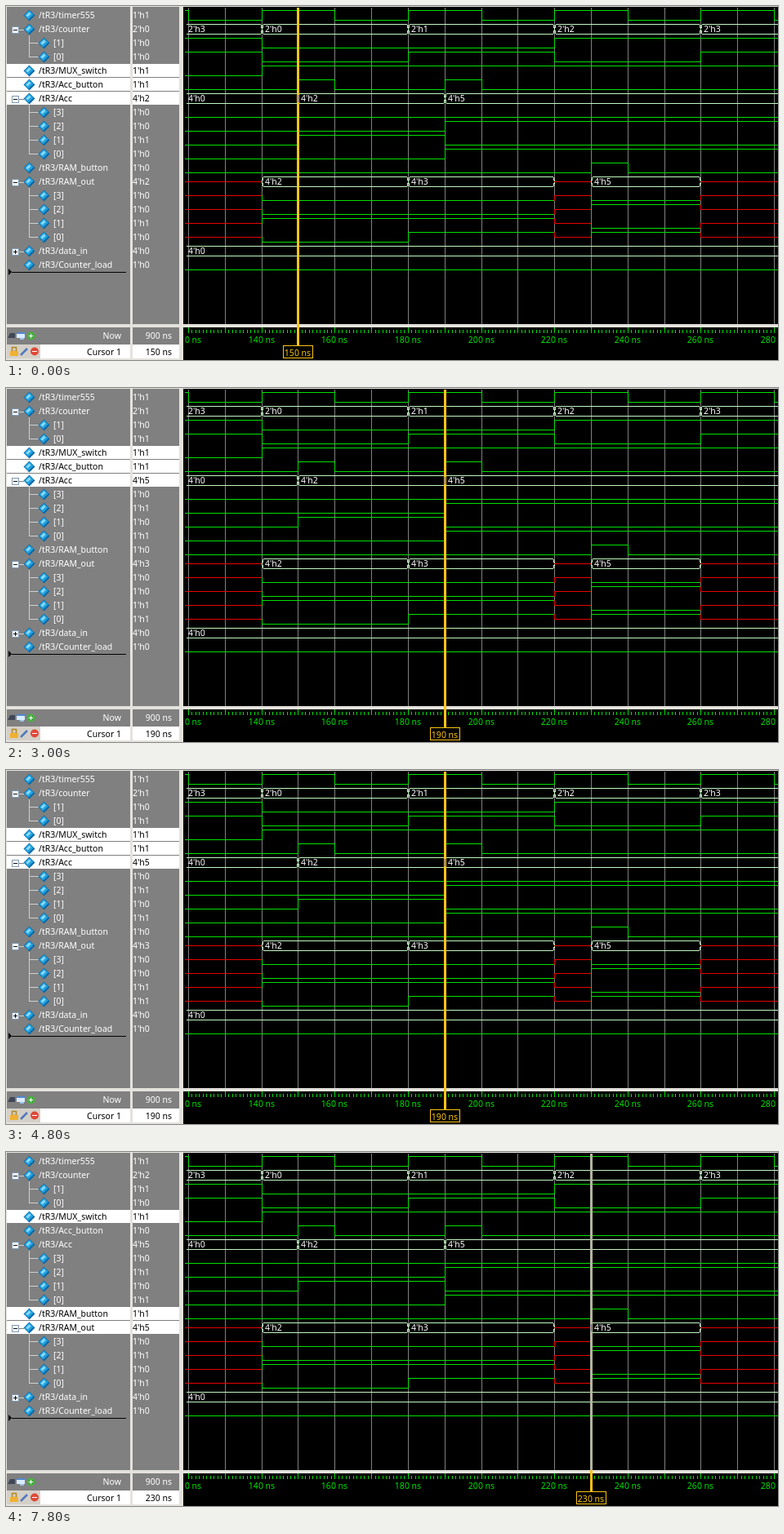
Write an HTML page with a canvas that moves like this. It is 945 by 434 pixels and loops after 9000 ms.

```html
<!DOCTYPE html>
<html lang="en">
<head>
<meta charset="utf-8">
<title>Waveform viewer</title>
<style>
  html, body { margin: 0; overflow: hidden; background: #000; }
  canvas { display: block; }
</style>
</head>
<body>
<canvas id="stage" width="945" height="434"></canvas>
<script>
const ctx = document.getElementById('stage').getContext('2d');
const GREEN = '#00e000', PALE = '#c0f8c0', RED = '#e80000', GREY = '#808080', GOLD = '#fcc414', FRAME = '#e4e2dc';
const END = 290, LEFT = 219, NS = 4.482;

// Steps are [time, value] pairs; null means undriven.
const timer = Array.from({ length: 10 }, (_, i) => [100 + 20 * i, 1 - i % 2]);
const rows = [];
function signal(name, steps, options = {}) {
  rows.push({ name, steps, width: 1, ...options });
}
function bus(name, width, steps, box = '-') {
  rows.push({ name, width, steps, box });
  if (box === '+') return;
  for (let bit = width - 1; bit >= 0; bit--) {
    const bits = steps.map(([t, v]) => [t, v === null ? null : v >> bit & 1]);
    signal(`[${bit}]`, bits, { child: true, last: bit === 0 });
  }
}
signal('/tR3/timer555', timer);
bus('/tR3/counter', 2, [[100, 3], [140, 0], [180, 1], [220, 2], [260, 3]]);
signal('/tR3/MUX_switch', [[100, 0], [140, 1]]);
signal('/tR3/Acc_button', [[100, 0], [150, 1], [160, 0], [190, 1], [200, 0]]);
bus('/tR3/Acc', 4, [[100, 0], [150, 2], [190, 5]]);
signal('/tR3/RAM_button', [[100, 0], [230, 1], [240, 0]]);
bus('/tR3/RAM_out', 4, [[100, null], [140, 2], [180, 3], [220, null], [230, 5], [260, null]]);
bus('/tR3/data_in', 4, [[100, 0]], '+');
signal('/tR3/Counter_load', [[100, 0]]);

const scenes = [
  { time: 150, selected: [4, 5, 6], mark: 6, color: GOLD },
  { time: 190, selected: [4, 5, 6], mark: 6, color: GOLD },
  { time: 230, selected: [4, 11, 12], mark: 12, color: '#b4b4a0' }
];

const rowY = i => 11 + 17 * i;
const timeX = t => Math.round(312.6 + (t - 140) * NS);
const valueAt = (row, t) => row.steps.filter(step => step[0] <= t).pop()[1];

function rect(x, y, w, h, color) {
  ctx.fillStyle = color;
  ctx.fillRect(x, y, w, h);
}
const hLine = (x1, x2, y, color) => rect(x1, y, x2 - x1 + 1, 1, color);
const vLine = (x, y1, y2, color) => rect(x, Math.min(y1, y2), 1, Math.abs(y2 - y1) + 1, color);
function text(str, x, y, color = '#fff', align = 'left') {
  ctx.fillStyle = color;
  ctx.textAlign = align;
  ctx.fillText(str, x, y);
}
function shape(color, ...points) {
  ctx.fillStyle = color;
  ctx.beginPath();
  for (const [x, y] of points) ctx.lineTo(x, y);
  ctx.fill();
}
function disc(x, y, r, color) {
  ctx.fillStyle = color;
  ctx.beginPath();
  ctx.arc(x, y, r, 0, 7);
  ctx.fill();
}

function diamond(x, y) {
  shape('#0868a8', [x - 7, y], [x, y - 7], [x + 7, y], [x, y + 7]);
  shape('#24a4e0', [x - 6, y], [x, y - 6], [x + 5, y - 1], [x - 1, y + 5]);
  shape('#8cdcfc', [x - 4, y], [x, y - 4], [x + 2, y - 2], [x - 2, y + 2]);
}

function drawRow(row, i, scene) {
  const y = rowY(i), selected = scene.selected.includes(i);
  const ink = selected ? '#000' : '#fff';
  if (selected) {
    rect(1, y - 8, 151, 16, '#fff');
    rect(155, y - 8, 57, 16, '#fff');
  }
  if (row.child) {
    vLine(28, y - 9, row.last ? y : y + 8, '#d0d0d0');
    hLine(28, 39, y, '#d0d0d0');
  }
  if (row.box) {
    hLine(16, 21, y + 1, selected ? GREY : '#d0d0d0');
    rect(7, y - 3, 9, 9, '#8098b0');
    rect(8, y - 2, 7, 7, '#fff');
    hLine(9, 13, y + 1, '#000');
    if (row.box === '+') vLine(11, y - 1, y + 3, '#000');
  }
  diamond(row.child ? 46.5 : 28.5, y + 0.5);
  text(row.name, row.child ? 58 : 40, y + 4, ink);
  text(`${row.width}'h${valueAt(row, scene.time)}`, 155, y + 4, ink);
}

// Calls paint(x1, x2, value, previous value) for each visible step.
function eachSpan({ steps }, paint) {
  steps.forEach(([t, v], k) => {
    const x1 = Math.max(LEFT, timeX(t)), x2 = timeX(steps[k + 1]?.[0] ?? END);
    if (x2 >= LEFT) paint(x1, x2, v, steps[k - 1]?.[1]);
  });
}

function drawBus(row, y) {
  eachSpan(row, (x1, x2, v) => {
    if (v === null) return hLine(x1, x2, y, RED);
    hLine(x1 + 2, x2 - 2, y - 6, PALE);
    hLine(x1 + 2, x2 - 2, y + 6, PALE);
    for (const [x, side] of [[x1, 1], [x2, -1]]) {
      if (x === LEFT) continue;
      vLine(x + side, y - 5, y - 2, PALE);
      vLine(x, y - 2, y + 2, PALE);
      vLine(x + side, y + 2, y + 5, PALE);
    }
    text(`${row.width}'h${v}`, x1 + 4, y + 4);
  });
}

function drawBit(row, y) {
  const level = v => v === null ? y : v ? y - 6 : y + 6;
  eachSpan(row, (x1, x2, v, before) => {
    const color = v === null ? RED : GREEN;
    hLine(x1, x2, level(v), color);
    if (x1 > LEFT && before !== v) vLine(x1, level(before), level(v), color);
  });
}

function drawWaves(scene) {
  ctx.save();
  ctx.beginPath();
  ctx.rect(LEFT, 1, 945 - LEFT, 433);
  ctx.clip();
  for (let t = 120; t <= 280; t += 10) vLine(timeX(t), 2, 389, GREY);
  rows.forEach((row, i) => (row.box ? drawBus : drawBit)(row, rowY(i)));
  rect(LEFT, 390, 945 - LEFT, 4, FRAME);
  for (let t = 119; t <= 282; t++) vLine(timeX(t), t % 10 ? 397 : 394, 400, GREEN);
  for (let t = 120; t <= 280; t += 20) text(`${t} ns`, timeX(t), 413, GREEN, 'center');

  const x = timeX(scene.time), y = rowY(scene.mark);
  rect(x - 1, 2, 3, 388, scene.color);
  rect(x - 1, 390, 3, 26, GOLD);
  vLine(x, y - 4, y + 4, '#5050e0');
  rect(x - 18, 416, 37, 16, GOLD);
  rect(x - 17, 417, 35, 14, '#000');
  text(`${scene.time} ns`, x, 429, GOLD, 'center');
  ctx.restore();
}

function drawFooter(scene) {
  rect(0, 390, LEFT, 4, FRAME);
  rect(1, 415, 41, 17, '#d4d0c8');
  rect(42, 415, 170, 17, '#fff');
  text('Now', 141, 408, '#fff', 'right');
  text('900 ns', 203, 408, '#fff', 'right');
  text('Cursor 1', 141, 428, '#000', 'right');
  text(`${scene.time} ns`, 203, 428, '#000', 'right');

  shape('#404858', [2, 407], [5, 401], [11, 401], [11, 407]);
  rect(13, 400, 10, 7, '#d8ecfc');
  rect(13, 400, 10, 2, '#5088d0');
  rect(17, 407, 5, 2, '#a0c0e0');
  disc(30.5, 404.5, 5, '#48b040');
  hLine(28, 32, 404, '#fff');
  vLine(30, 402, 406, '#fff');

  ctx.strokeStyle = '#b08820';
  ctx.lineWidth = 1.5;
  ctx.strokeRect(7.5, 418.5, 5, 5);
  rect(5, 423, 10, 6, '#f0b030');
  ctx.strokeStyle = '#5078c0';
  ctx.lineWidth = 2.5;
  ctx.beginPath();
  ctx.moveTo(18, 428);
  ctx.lineTo(26, 420);
  ctx.stroke();
  disc(35, 423.5, 5, '#e04838');
  hLine(32, 37, 423, '#fff');
}

function drawFrames() {
  hLine(0, 944, 0, FRAME);
  vLine(0, 0, 433, FRAME);
  rect(0, 432, 217, 2, FRAME);
  rect(152, 0, 3, 434, FRAME);
  rect(212, 0, 5, 434, FRAME);
}

function draw(scene) {
  rect(0, 0, 945, 434, '#000');
  rect(0, 0, 217, 434, GREY);
  ctx.font = '10.5px "Noto Sans", "Open Sans", sans-serif';
  rows.forEach((row, i) => drawRow(row, i, scene));
  hLine(7, 146, 326, '#000');
  shape('#000', [3, 322], [7, 326], [3, 330]);
  drawFooter(scene);
  drawFrames();
  drawWaves(scene);
}

function tick() {
  draw(scenes[Math.floor(performance.now() / 3000) % scenes.length]);
  requestAnimationFrame(tick);
}
tick();
</script>
</body>
</html>
```
